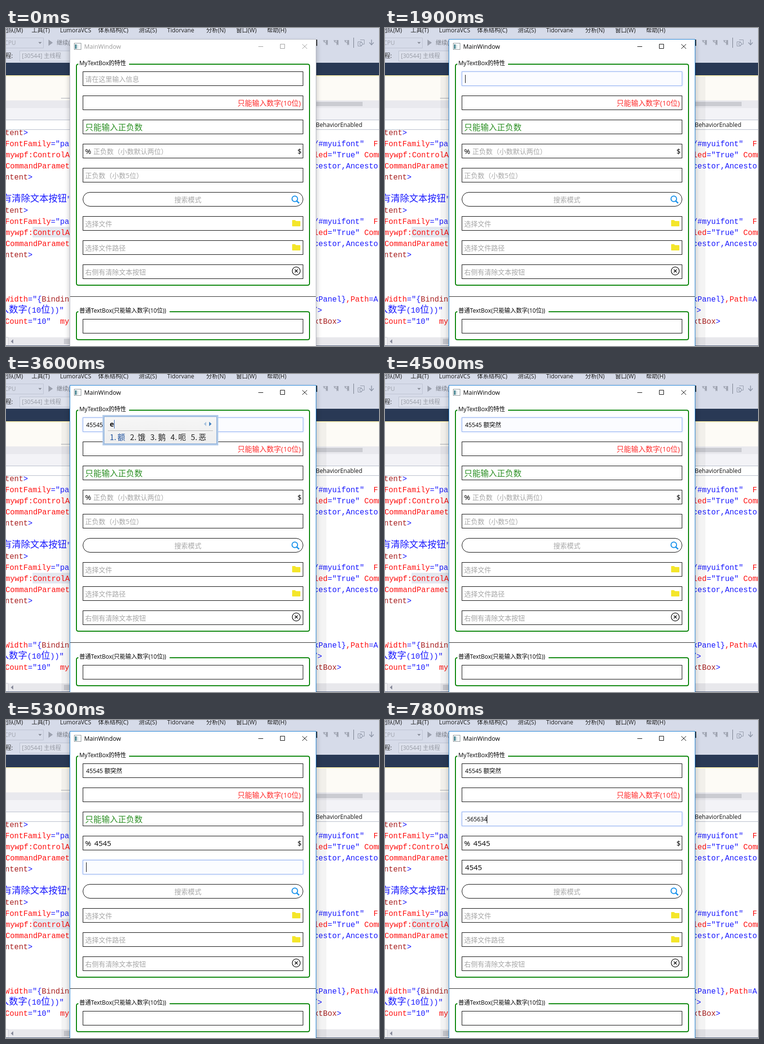
An HTML page that plays this animation: 773 by 659 pixels, repeating every 8 s.

```html
<!DOCTYPE html>
<html lang="zh">
<head>
<meta charset="utf-8">
<title>MainWindow</title>
<style>
html, body { margin: 0; width: 100%; height: 100%; overflow: hidden; background: #fff; }
svg { display: block; width: 773px; height: 659px; }
text { white-space: pre; font: 12px "Open Sans", "Noto Sans CJK SC", "Noto Sans CJK", sans-serif; }
.code { font: 15.85px "Liberation Mono", "Noto Sans CJK SC", "Noto Sans CJK", monospace; }
.code .zh { font-size: 19px; font-weight: 300; }
.ime { font: 300 16px "Noto Sans CJK SC", "Noto Sans CJK", sans-serif; }
</style>
</head>
<body>
<svg id="stage" viewBox="0 0 773 659">
  <defs>
    <filter id="glow" x="-5%" y="-50%" width="110%" height="200%"><feGaussianBlur stdDeviation="2"/></filter>
    <filter id="soft" x="-10%" y="-10%" width="120%" height="120%"><feGaussianBlur stdDeviation="6"/></filter>
    <linearGradient id="panel" x2="0" y2="1"><stop stop-color="#f6f6f6"/><stop offset="1" stop-color="#eeeeee"/></linearGradient>
    <linearGradient id="app"><stop offset=".3" stop-color="#3f7f8c"/><stop offset=".6" stop-color="#dfe9ea"/></linearGradient>
  </defs>
</svg>
<script>
const NS = 'http://www.w3.org/2000/svg';
const stage = document.getElementById('stage');
const LOOP = 8000;

function add(tag, attrs, parent = stage) {
  const el = document.createElementNS(NS, tag);
  for (const key in attrs) el.setAttribute(key, attrs[key]);
  return parent.appendChild(el);
}
const rect = (x, y, width, height, fill, extra, parent) =>
  add('rect', { x, y, width, height, fill, ...extra }, parent);
const path = (d, stroke, extra, parent) =>
  add('path', { d, stroke, fill: 'none', ...extra }, parent);
function label(x, y, str, fill = '#111', size = 12, extra, parent) {
  const el = add('text', { x, y, fill, ...extra }, parent);
  el.style.fontSize = size + 'px';
  el.textContent = str;
  return el;
}

// Code line: alternating colour key and text; CJK runs get the larger size.
const INK = { r: '#ff1010', b: '#1818ff', m: '#a82020' };
function code(x, y, ...parts) {
  const line = add('text', { x, y: y + 6, class: 'code' });
  for (let i = 0; i < parts.length; i += 2) {
    for (const run of parts[i + 1].match(/[\u4e00-\u9fff]+|[^\u4e00-\u9fff]+/g)) {
      const span = add('tspan', { fill: INK[parts[i]] }, line);
      if (run.charCodeAt(0) > 0x4dff) span.setAttribute('class', 'zh');
      span.textContent = run;
    }
  }
}

function drawEditor() {
  rect(0, 0, 773, 72, '#d6dbe9');
  rect(0, 72, 773, 26, '#293955');
  rect(0, 98, 773, 52, '#fdfbf6');
  rect(0, 98, 773, 2, '#fff3b4');
  rect(0, 150, 773, 16, '#e9e9ee');
  rect(642, 153, 97, 9, '#cbccd2');
  rect(0, 166, 773, 24, '#f3f3f7');
  path('M114 145.5H133', '#a4a8b0');
  path('M0 190.5H773M0 210.5H773', '#b4bac8');

  const menu = [[-7, '团队(M)'], [53, '工具(T)'], [112, 'LumoraVCS'], [191, '体系结构(C)'], [275, '测试(S)'],
    [334, 'Tidorvane'], [415, '分析(N)'], [477, '窗口(W)'], [541, '帮助(H)']];
  for (const [x, str] of menu) label(x, 9, str, '#1b1b1b');

  path('M0 20.5H77.5V41.5H0', '#bcc2d1');
  label(-3, 35, 'CPU', '#a0a4ae');
  add('path', { d: 'M67 29h7l-3.5 4z', fill: '#8b909c' });
  add('path', { d: 'M88 24l9 6.500-9 6.500z', fill: '#9ba0ad' });
  label(105, 35, '继续(C)', '#777b85');
  label(-13, 62, '线程:', '#333');
  rect(28.5, 47.5, 120, 21, '#dde1ec', { stroke: '#bcc2d1' });
  label(33, 62, '[30544] 主线程', '#979ba5');

  rect(642, 24, 3, 13, '#333');
  for (const x of [657, 679, 701]) {
    path(`M${x} 26h5M${x + 1} 29l3-3M${x + 2} 28l4 3`, '#a0a5b2', { 'stroke-width': 1.5 });
    add('path', { d: `M${x + 6} 25h4v11l-2-2-2 2z`, fill: '#a0a5b2' });
  }
  path('M720.5 20V41', '#6f7686');
  path('M729.500 28.500h7v9h-7zM734 24.500h8.500v9h-5', '#9299a8');
  add('circle', { cx: 736, cy: 33, r: 3, fill: '#d6dbe9', stroke: '#8b93a5' });
  path('M757.500 24v10M753 30l4.500 5 4.500-5', '#8b93a5', { 'stroke-width': 1.5 });

  label(642, 205, 'BehaviorEnabled', '#111', 12.2);

  rect(55, 412, 80, 22, '#e4e8f0');
  for (const y of [216, 377]) {
    code(-2, y, 'm', 'tent', 'b', '>');
    code(-2, y + 23, 'r', 'FontFamily', 'b', '="pa');
    code(-1, y + 46, 'r', 'mywpf:ControlA');
    code(-1, y + 69, 'r', 'CommandParamet');
    code(-2, y + 92, 'm', 'ntent', 'b', '>');
    code(638, y + 23, 'b', '/#myuifont"  ', 'r', 'F');
    code(638, y + 46, 'r', 'led', 'b', '="True" ', 'r', 'Comm');
    code(638, y + 69, 'b', 'cestor,Ancestor');
  }
  code(-7, 354, 'b', '有清除文本按钮"');
  code(-2, 561, 'r', 'Width', 'b', '="{', 'm', 'Bindin');
  code(638, 561, 'b', 'kPanel}', 'r', ',Path', 'b', '=A');
  code(-13, 584, 'b', '入数字(10位))"');
  code(636, 584, 'b', '/>');
  code(-2, 607, 'r', 'Count', 'b', '="10"  ', 'r', 'my');
  code(638, 607, 'm', 'xtBox', 'b', '>');

  rect(0, 641, 773, 17, '#e8e8ec');
  rect(0, 641, 4, 17, '#fff', { stroke: '#c8cad2' });
  rect(120, 644, 20, 11, '#cbccd2');
  add('path', { d: 'M15 645v9l-5-4.500z', fill: '#868999' });
  rect(0, 658, 773, 1, '#4b5a78');
}

function groupBox(y, bottom, gap, title) {
  path(`M150 ${y}Q146 ${y} 146 ${y + 4}V${bottom - 4}Q146 ${bottom} 150 ${bottom}H625Q629 ${bottom} 629 ${bottom - 4}V${y + 4}Q629 ${y} 625 ${y}H${gap}`,
    '#008000', { 'stroke-width': 2 });
  label(152, y + 2, title, '#000');
}

const frameBox = (y, stroke, extra, parent) =>
  rect(159.5, y, 456, 29, '#fff', { stroke, ...extra }, parent);

// hint, x, colour, size, typed size, typed x
const GREY = '#a6a6a6';
const FIELDS = [
  ['请在这里输入信息', 164, GREY, 14, 12.2, 166],
  ['只能输入数字(10位)', 611, '#ff2a2a', 15, 12.2, 166],
  ['只能输入正负数', 164, '#2b8f23', 17, 12.2, 166],
  ['正负数（小数默认两位）', 181, GREY, 14, 15.3, 183],
  ['正负数（小数5位）', 164, GREY, 14, 15.3, 166],
  ['搜索模式', 349, GREY, 14, 12.2, 166],
  ['选择文件', 164, GREY, 14, 12.2, 166],
  ['选择文件路径', 164, GREY, 14, 12.2, 166],
  ['右侧有清除文本按钮', 164, GREY, 14, 12.2, 166]
];

function makeField([hint, x, color, size, typedSize, typedX], i) {
  const y = 90.5 + i * 50;
  frameBox(y, '#000', { rx: i === 5 ? 14.5 : 0 });
  const focus = add('g', { opacity: 0 });
  rect(158.5, y - 0.5, 458, 30, '#c9d8fb', { filter: 'url(#glow)' }, focus);
  frameBox(y, '#8eaef0', { fill: '#fbfcff' }, focus);
  const hintEl = label(x, y + (size > 16 ? 21.5 : 20.5), hint, color, size, i === 1 ? { 'text-anchor': 'end' } : {});
  const typed = label(typedX, y + (typedSize > 14 ? 20.5 : 19.5), '', '#000', typedSize);
  return { focus, hintEl, typed, x: typedX, y, large: typedSize > 14 };
}

function drawIcons() {
  label(164, 261, '%', '#000', 15.2);
  label(604, 261, '$', '#000', 15.2);
  add('circle', { cx: 598.5, cy: 354, r: 5.8, fill: 'none', stroke: '#1590ea', 'stroke-width': 2 });
  path('M602.5 358.500l5 4.500', '#1590ea', { 'stroke-width': 2.6 });
  for (const y of [398, 448])
    add('path', { d: `M594 ${y}h5l2 2h8q1 0 1 1v9q0 1-1 1h-15q-1 0-1-1v-11q0-1 1-1z`, fill: '#f4e62a' });
  add('circle', { cx: 601.5, cy: 503.5, r: 8.3, fill: 'none', stroke: '#000', 'stroke-width': 1.2 });
  path('M598.500 500.500l6 6m0-6l-6 6', '#000', { 'stroke-width': 1.4 });
}

function makePopup() {
  const g = add('g', {});
  const frame = rect(202, 87, 236, 59, 'url(#panel)', { stroke: '#b2cbe9', 'stroke-width': 4 }, g);
  const inner = rect(203.5, 88.5, 233, 56, 'none', { stroke: '#86aad6' }, g);
  const input = label(215, 109, '', '#111', 15, {}, g);
  input.style.fontWeight = 700;
  const bar = rect(224, 95, 1, 18, '#2a62b8', {}, g);
  const rule = path('', '#b9b9b9', {}, g);
  const prev = add('path', { fill: '#a9c3df' }, g);
  const next = add('path', { fill: '#3f7fbf' }, g);
  const list = add('text', { x: 215, y: 137, class: 'ime' }, g);
  return (str, right, words) => {
    g.style.display = str ? '' : 'none';
    if (!str) return;
    frame.setAttribute('width', right - 204);
    inner.setAttribute('width', right - 207);
    input.textContent = str;
    bar.setAttribute('x', Math.floor(215.5 + input.getComputedTextLength()));
    rule.setAttribute('d', `M211 117.500H${right - 11}`);
    prev.setAttribute('d', `M${right - 25} 99v9l-5-4.500z`);
    next.setAttribute('d', `M${right - 19} 99v9l5-4.500z`);
    list.textContent = '';
    let x = 215;
    words.forEach((word, i) => {
      for (const [dx, s] of [[0, i + 1 + '.'], [16, word]])
        add('tspan', { x: x + dx, fill: i ? '#222' : '#1c4f9c' }, list).textContent = s;
      x += 26 + 16 * word.length;
    });
  };
}

drawEditor();
const halo = rect(115, 100, 549, 559, '#000', { opacity: 0 });
rect(132, 30, 511, 660, '#000', { opacity: 0.25, filter: 'url(#soft)' });
const win = rect(132.5, 23.5, 510, 660, '#fff', {});
rect(141.5, 31.5, 14, 13, '#fff', { stroke: '#8a9296' });
rect(143, 34, 7, 9, 'url(#app)');
const title = label(162, 43, 'MainWindow', '#999', 12.5);
const buttons = path('M523 38.500h10M568.500 33.500h9v9h-9zM614 33.500l10 9.500m0-9.500l-10 9.500', '#999');
groupBox(75, 533, 255, 'MyTextBox的特性');
const fields = FIELDS.map(makeField);
drawIcons();
path('M133 556.500H642', '#222');
groupBox(588, 646, 339, '普通TextBox(只能输入数字(10位))');
frameBox(603.5, '#000');
const caret = rect(166, 97, 1, 17, '#000');
const popup = makePopup();

// time, focused field, its text, caret shown, focus strength
const STEPS = [
  [900, 0, '', 0, 0.5], [1000, 0, '', 1], [1500, 0, '', 0], [1900, 0, '', 1],
  [2400, 0, '4', 1], [2500, 0, '45', 1], [2600, 0, '455', 1], [2800, 0, '45545', 1],
  [3300, 0, '45545', 0], [3400, 0, '45545 ', 1], [4000, 0, '45545 额突然', 1], [4500, 0, '45545 额突然', 0],
  [4800, 3, '', 1, 0.5], [4900, 3, '45', 1], [5000, 3, '4545', 1],
  [5200, 4, '', 1, 0.5], [5300, 4, '', 1], [5600, 4, '45', 1], [5900, 4, '4545', 1],
  [6300, 2, '', 1], [6900, 2, '-', 1], [7300, 2, '-56', 1], [7500, 2, '-5656', 1],
  [7700, 2, '-56563', 1], [7800, 2, '-565634', 1]
];

function render(t) {
  const past = STEPS.filter(s => s[0] <= t);
  const now = past[past.length - 1];
  const texts = {};
  for (const [, i, str] of past) texts[i] = str;

  const active = past.length > 0;
  win.setAttribute('stroke', active ? '#1a82d8' : '#b5b9c4');
  title.setAttribute('fill', active ? '#000' : '#999');
  buttons.setAttribute('stroke', active ? '#000' : '#999');
  halo.setAttribute('opacity', active ? 0.045 : 0);

  fields.forEach((f, i) => {
    const level = now && now[1] === i ? now[4] || 1 : 0;
    f.focus.setAttribute('opacity', level);
    f.hintEl.setAttribute('opacity', texts[i] ? 0 : 1 - level);
    f.typed.textContent = texts[i] || '';
  });

  const imeOpen = t >= 3600 && t < 4000;
  caret.style.display = now && now[3] && !imeOpen ? '' : 'none';
  if (now) {
    const f = fields[now[1]];
    const width = now[2] ? f.typed.getComputedTextLength() : 0;
    caret.setAttribute('x', Math.floor(f.x + width));
    caret.setAttribute('y', f.y + (f.large ? 4.5 : 6.5));
    caret.setAttribute('height', f.large ? 20 : 17);
  }
  if (!imeOpen) popup('');
  else if (t < 3800) popup('e', 440, ['额', '饿', '鹅', '呃', '恶']);
  else popup("e't'r", 536, ['额突然', '恶徒', '饿徒', '恶兔', '额头']);
}

const start = performance.now();
let shown = -1;
function tick() {
  const t = Math.floor(((performance.now() - start) % LOOP) / 100) * 100;
  if (t !== shown) render(shown = t);
  requestAnimationFrame(tick);
}
tick();
</script>
</body>
</html>
```
